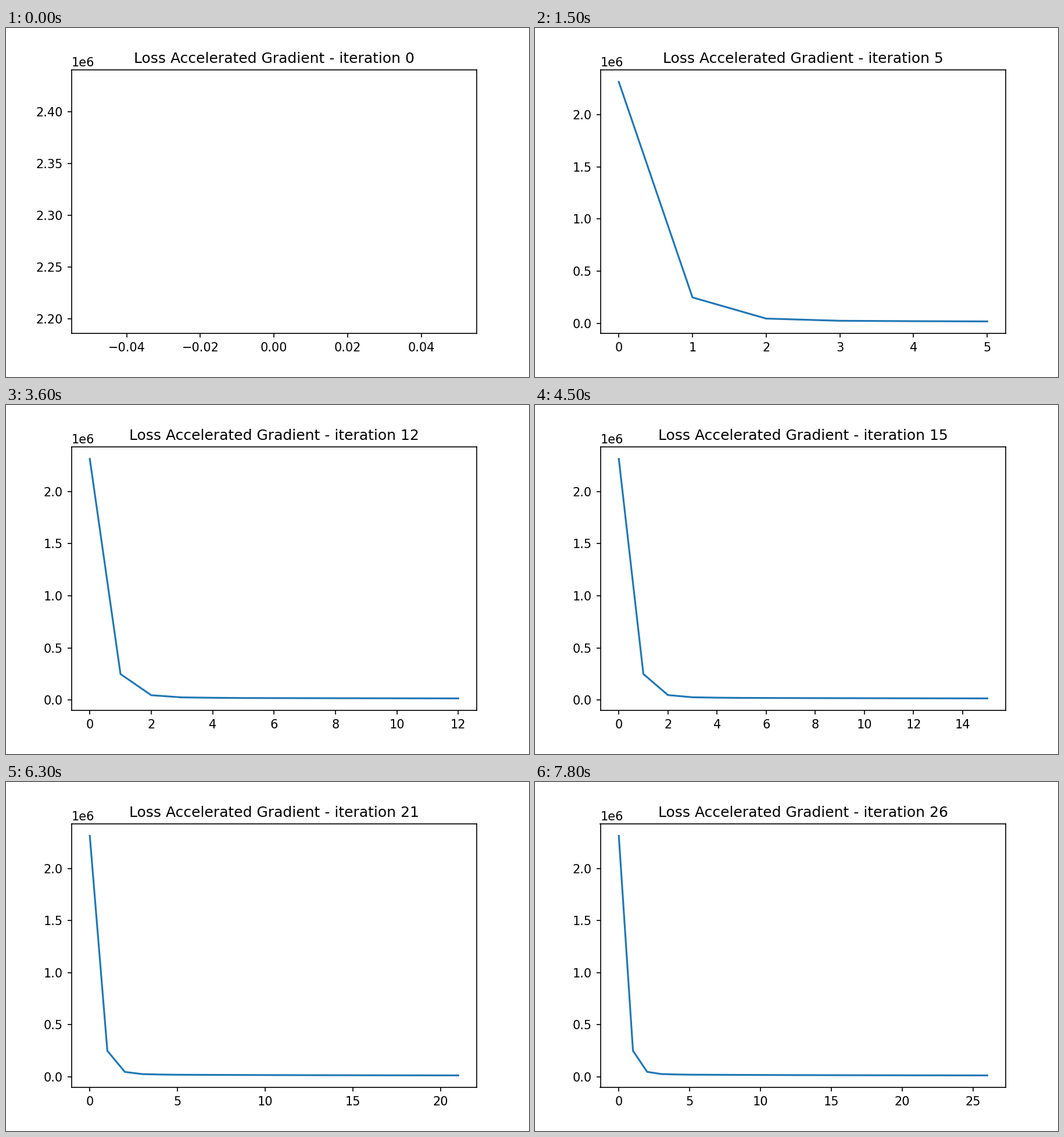
Recreate the animation shown at these times as a matplotlib script. Size 900 by 600 pixels, loop 8000 ms.

```python
import matplotlib.pyplot as plt
import numpy as np
from matplotlib.animation import FuncAnimation

INTERVAL = 100          # ms per animation frame
FRAMES = 80
HOLD = 3                # animation frames per iteration

steps = np.arange(FRAMES // HOLD + 1)
# Steep initial drop, then a slow exponential tail
loss = 11500 + 8500 * np.exp(-(steps - 5) / 12)
loss[:5] = 2313200, 249500, 47000, 26000, 22200

plt.rcParams["font.family"] = "DejaVu Sans"
fig, ax = plt.subplots(figsize=(6, 4), dpi=150, facecolor="white")
fig.subplots_adjust(left=0.125, right=0.9, bottom=0.125, top=0.88)


def draw(frame):
    iteration = frame // HOLD
    shown = slice(0, iteration + 1)
    ax.clear()
    ax.plot(steps[shown], loss[shown], color="#1f77b4", linewidth=1.5)
    ax.set_title(f"Loss Accelerated Gradient - iteration {iteration}")
    return ax.lines


animation = FuncAnimation(fig, draw, frames=FRAMES, init_func=lambda: draw(0),
                          interval=INTERVAL, repeat=True, repeat_delay=0)
plt.show()
```
